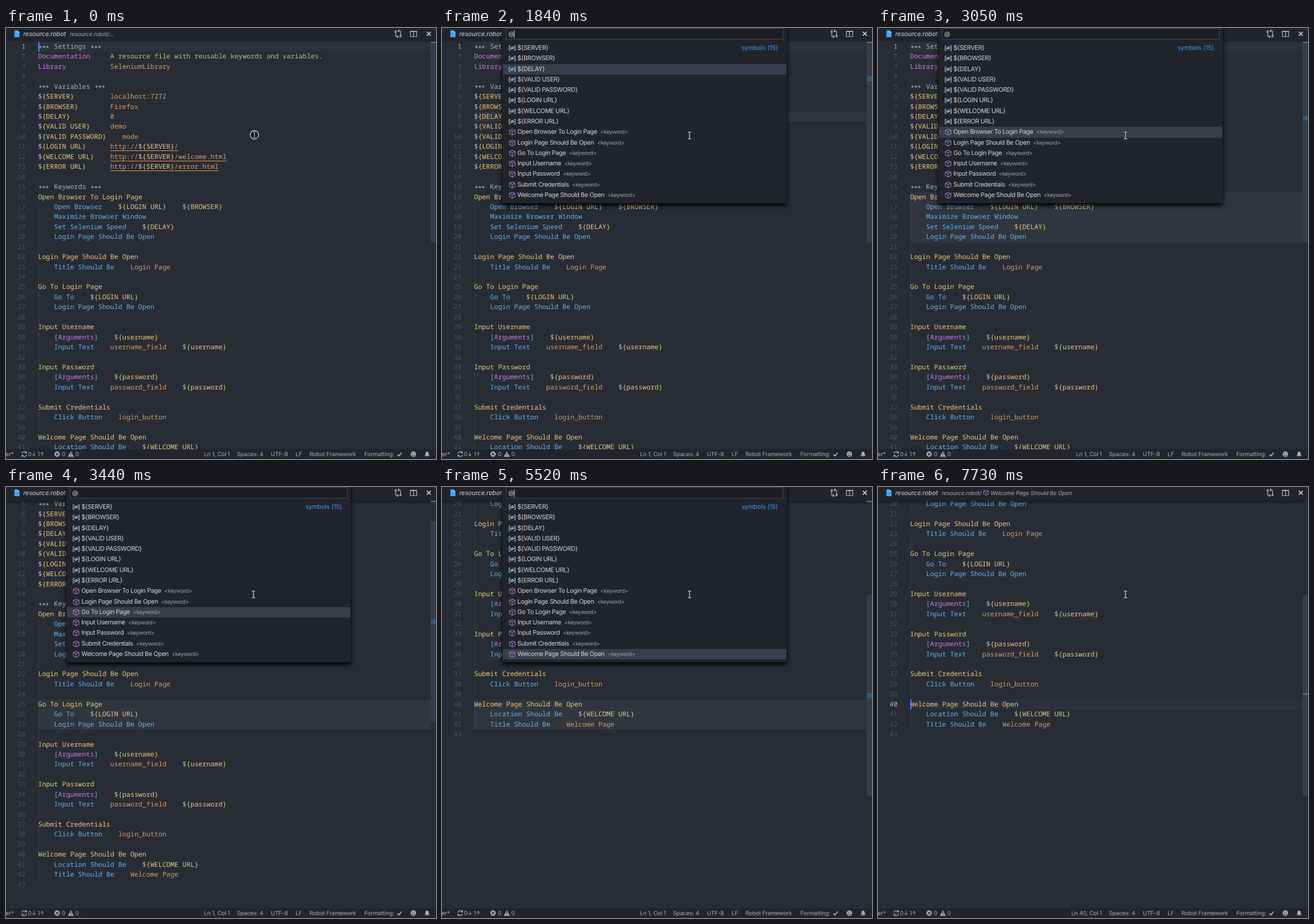
Animation of 747x750 px, one loop 8 s. Source, as an HTML page:

```html
<!DOCTYPE html>
<html lang="en">
<head>
<meta charset="utf-8">
<title>Symbol navigation</title>
<style>
  html, body { margin: 0; width: 100%; height: 100%; overflow: hidden; background: #282c34; }
  body { position: relative; text-rendering: geometricPrecision; }
  div { position: absolute; box-sizing: border-box; }
  .ui { font-family: Inter, "Liberation Sans", sans-serif; letter-spacing: -.024em; }

  #editor { left: 0; top: 24px; width: 747px; height: 709px; overflow: hidden; }
  #page { left: 0; top: 0; width: 738px; }
  #page div { white-space: pre; }
  #lines { left: 0; top: 0; }
  .code, .num { font: 11.62px/17.436px "Noto Sans Mono", "DejaVu Sans Mono", monospace; height: 17.436px; }
  .code { left: 55.7px; color: #abb2bf; }
  .num { left: 0; width: 34px; text-align: right; color: #495162; }
  .num.on { color: #abb2bf; }
  .guide { left: 56px; width: 1px; background: #3b4048; }
  .band { left: 56px; width: 682px; }
  #cursorLine { background: #2c313c; height: 17.436px; }
  #range { background: rgba(255, 255, 255, .045); }
  #caret { left: 56px; width: 1.6px; height: 17px; background: #528bff; }
  .code b { font-weight: 400; }
  .star { display: inline-block; width: 3ch; padding-left: .5px; box-sizing: border-box;
          font-style: normal; letter-spacing: -1px; position: relative; top: 2.5px; }
  .purple { color: #d078e8; } .green { color: #a2cf78; } .orange { color: #dd9a5e; }
  .yellow { color: #f0c977; } .blue { color: #5bb4fa; } .cyan { color: #4fc3d0; } .grey { color: #b9bdc0; }
  .link { text-decoration: underline 1px; text-underline-offset: 2.5px; }
  #edge { left: 0; top: 0; width: 738px; height: 6px; background: linear-gradient(rgba(0,0,0,.4), transparent); }
  #thumb { left: 738px; width: 9px; background: #373d48; }
  .mark { left: 738px; width: 9px; }
  #cursorMark { height: 2px; background: #4f7596; }
  #rangeMark { height: 8.6px; background: #2d5b86; }

  #chrome { position: absolute; left: 0; top: 0; }
  .tab { font-size: 10.8px; font-style: italic; letter-spacing: -.007em; fill: #d7dae0; }
  .crumb { font-size: 9.75px; font-style: italic; letter-spacing: -.018em; fill: #a3a9b5; }
  .status { font-size: 9.97px; letter-spacing: -.015em; fill: #a6adba; }
  .line { fill: none; stroke: #b4bac6; stroke-width: 1.2; }

  #picker { left: 105px; top: -4px; width: 494px; background: #21252b; overflow: hidden; }
  #shade { left: 105px; top: -4px; width: 494px; box-shadow: 0 4px 7px #000; }
  #field { left: 6px; top: 4px; width: 482px; height: 20px; background: #1b1d23; border: 1px solid #464646;
           color: #d0d4dc; font-size: 10.8px; line-height: 19px; padding-left: 3px; }
  #fieldCaret { left: 13.4px; top: 3px; width: 1px; height: 14px; background: #d0d4dc; }
  #rows { left: 0; top: 30px; }
  .row { left: 1px; width: 492px; height: 18.28px; line-height: 18.28px; font-size: 10.8px; color: #d3d6dc; white-space: pre; }
  .row svg { position: absolute; left: 9.5px; top: 3px; }
  .row span { position: absolute; left: 25px; }
  .row small { font-size: 9.6px; color: #9a9fa9; margin-left: 5.5px; }
  .row.on { background: #383e4a; }
  #group { right: 15.5px; top: 30px; line-height: 18.28px; font-size: 10.8px; letter-spacing: -.01em; color: #3f97f3; }
  #mouse { position: absolute; left: 420px; top: 174px; }
</style>
</head>
<body>
<div id="editor">
  <div id="page">
    <div id="cursorLine" class="band"></div>
    <div id="range" class="band"></div>
    <div id="lines"></div>
    <div id="caret"></div>
  </div>
  <div id="edge"></div>
  <div id="thumb"></div>
  <div id="rangeMark" class="mark"></div>
  <div id="cursorMark" class="mark"></div>
</div>

<svg id="chrome" class="ui" width="747" height="750">
  <defs>
    <symbol id="cube" viewBox="0 0 12 12">
      <path d="M6 .8 10.8 3v6L6 11.3 1.2 9V3ZM1.2 3 6 5.3 10.8 3M6 5.3v6" fill="none" stroke="#b180d7"/>
    </symbol>
    <symbol id="variable" viewBox="0 0 12 12">
      <path d="M3 2H.8v8H3M9 2h2.2v8H9" fill="none" stroke="#c5c8ce" stroke-width="1.1"/>
      <path d="M2.6 5 6.8 3 9.4 4.2v2.2L5.2 8.6 2.6 7.3Z" fill="#75beff"/>
      <path d="M3.5 5.2 5.3 6 8.5 4.5" fill="none" stroke="#21252b" stroke-width=".7"/>
    </symbol>
    <path id="ibeam" d="M7 7q2.500 0 3 1 .5-1 3-1M10 8v10M7 19q2.500 0 3-1 .5 1 3 1"/>
  </defs>
  <path d="M0 0h747v24H0ZM0 733h747v17H0Z" fill="#21252b"/>
  <path d="M14.5 4h5l4 4v8h-9Z" fill="#42a5f5"/>
  <path d="M19.5 4v4h4" fill="#a5d4fa"/>
  <text class="tab" x="30" y="13.5">resource.robot</text>
  <text class="crumb" x="111" y="13.5">resource.robot/<tspan id="dots">...</tspan></text>
  <g id="place">
    <use href="#cube" x="182.500" y="4.5" width="10.5" height="10.5"/>
    <text class="crumb" x="195.5" y="13.5">Welcome Page Should Be Open</text>
  </g>
  <g class="line">
    <path d="M677 7.5v5.5q0 2 2 2h2M679.5 13l2 2-2 2M685.5 12.5V7q0-2-2-2h-2M683 3l-2 2 2 2"/>
    <circle cx="677" cy="6" r="1.4"/><circle cx="685.5" cy="14" r="1.4"/>
    <path d="M702.5 5.5h11v9.5h-11ZM708 5.5V15M702.5 6.2h11"/>
    <path d="M731 6.5l7 7M738 6.5l-7 7" stroke="#d7dae0" stroke-width="1.7"/>
    <path d="M27.7 740.5a4 4 0 0 1 7.3-1.5M35.7 742.5a4 4 0 0 1-7.3 1.5M35.5 736.5v3h-3M27.9 746.5v-3h3"/>
    <path d="M680 742l2.5 2.7 5-6" stroke-width="1.7"/>
  </g>
  <g fill="#a6adba">
    <circle cx="88.7" cy="741.5" r="4.7"/>
    <path d="M112.6 736.5l5.2 9.7h-10.4Z"/>
    <circle cx="707.7" cy="741.5" r="4.8"/>
    <path d="M727 744.8q1.7-1.3 1.7-4.3 0-3 2.8-3.5 2.8.5 2.8 3.5 0 3 1.7 4.3ZM730.3 745.4h2.4q-1.2 1.8-2.4 0Z"/>
  </g>
  <path d="M86.7 739.5l4 4M90.7 739.5l-4 4M112.6 739.5v3.5M112.6 744v1.2M705 742.5q2.7 3.5 5.4 0M706 739v1.5M709.4 739v1.5" fill="none" stroke="#21252b" stroke-width="1.2"/>
  <g class="status">
    <text x="-.5" y="745">er*</text>
    <text x="38" y="745">0↓ 1↑</text>
    <text x="97" y="745">0</text>
    <text x="120.5" y="745">0</text>
    <text id="position" x="389" y="745" text-anchor="end"></text>
    <text x="401" y="745">Spaces: 4</text>
    <text x="460" y="745">UTF-8</text>
    <text x="503" y="745">LF</text>
    <text x="527" y="745">Robot Framework</text>
    <text x="622.5" y="745">Formatting:</text>
  </g>
</svg>

<div id="shade"></div>
<div id="picker" class="ui">
  <div id="field">@<div id="fieldCaret"></div></div>
  <div id="rows"></div>
  <div id="group">symbols (15)</div>
</div>

<svg id="mouse" width="24" height="24">
  <circle id="ring" cx="11.5" cy="12" r="7.3" fill="#16181c" stroke="#e8e8e8" stroke-width="1.2"/>
  <g id="beam" fill="none">
    <use href="#ibeam" stroke="#111" stroke-width="2.6"/>
    <use href="#ibeam" stroke="#f2f2f2" stroke-width="1.2"/>
  </g>
</svg>

<script>
const SOURCE = `*** Settings ***
Documentation     A resource file with reusable keywords and variables.
Library           SeleniumLibrary

*** Variables ***
\${SERVER}         localhost:7272
\${BROWSER}        Firefox
\${DELAY}          0
\${VALID USER}     demo
\${VALID PASSWORD}    mode
\${LOGIN URL}      http://\${SERVER}/
\${WELCOME URL}    http://\${SERVER}/welcome.html
\${ERROR URL}      http://\${SERVER}/error.html

*** Keywords ***
Open Browser To Login Page
    Open Browser    \${LOGIN URL}    \${BROWSER}
    Maximize Browser Window
    Set Selenium Speed    \${DELAY}
    Login Page Should Be Open

Login Page Should Be Open
    Title Should Be    Login Page

Go To Login Page
    Go To    \${LOGIN URL}
    Login Page Should Be Open

Input Username
    [Arguments]    \${username}
    Input Text    username_field    \${username}

Input Password
    [Arguments]    \${password}
    Input Text    password_field    \${password}

Submit Credentials
    Click Button    login_button

Welcome Page Should Be Open
    Location Should Be    \${WELCOME URL}
    Title Should Be    Welcome Page
`;

const LOOP = 8000, LINE = 17.436, VIEW = 709, ROW = 18.28;
const OPEN = 530, LISTED = 650, CLOSE = 5760, JUMP = 5880, RING_END = 120;
const ROW_TIMES = [1370, 1610, 1840, 2080, 2310, 2460, 2690, 2930, 3050, 3290, 3440, 3790, 4030, 4450, 4900];
const FIELD_BLINKS = [650, 1130, 1610, 2080, 2580, 3050, 3610, 4030, 4630, 5020, 5520];
const EDITOR_BLINKS = [0, 120, 5880, 6300, 6770, 7250, 7730];

const byId = id => document.getElementById(id);
const sourceLines = SOURCE.split('\n');
const lineTop = n => (n - 1) * LINE;
const passed = (times, t) => times.filter(x => x <= t).length;
const blinking = (times, t) => passed(times, t) % 2 === 1;
const show = (id, on) => { byId(id).style.visibility = on ? 'inherit' : 'hidden'; };
const span = (cls, text) => `<b class="${cls}">${text}</b>`;

function cellClass(cell, first, indented) {
  if (!first) return cell.startsWith('A ') ? 'green' : /^http/.test(cell) ? 'orange link' : 'orange';
  if (/^(Documentation|Library|\[.*)$/.test(cell)) return 'purple';
  return indented ? 'blue' : 'yellow';
}

function paint(line) {
  if (line.startsWith('*')) return line.replace(/\*{3}/g, '<i class="star">***</i>');
  let first = true;
  return line.split(/( {2,})/).map(cell => {
    if (!cell.trim()) return cell;
    const cls = cellClass(cell, first, line.startsWith(' '));
    first = false;
    return span(cls, cell
      .replace(/[[\]]/g, m => span('cyan', m))
      .replace(/\$(\{.*?\})/g, (_, name) => span('grey', '$') + span('yellow', name)));
  }).join('');
}

// Symbols are the variables and the keyword blocks, each with its first and last line.
const symbols = [];
const keywordsFrom = sourceLines.indexOf('*** Keywords ***');
let html = '';
sourceLines.forEach((line, i) => {
  const n = i + 1, y = `top:${lineTop(n)}px`;
  html += `<div class="num" style="${y}">${n}</div><div class="code" style="${y}">${paint(line)}</div>`;
  const isVariable = line.startsWith('$');
  if (!isVariable && !(i > keywordsFrom && /^\w/.test(line))) return;
  let last = n;
  while (sourceLines[last].startsWith(' ')) last++;
  symbols.push({ name: isVariable ? line.match(/^.*?\}/)[0] : line, isVariable, first: n, last });
  if (!isVariable) {
    const end = Math.min(last + 1, sourceLines.length - 1);
    html += `<div class="guide" style="top:${lineTop(n + 1)}px;height:${(end - n) * LINE}px"></div>`;
  }
});
byId('lines').innerHTML = html;
byId('rows').innerHTML = symbols.map((s, i) => {
  const icon = s.isVariable ? 'variable' : 'cube';
  const kind = s.isVariable ? '' : '<small>&lt;keyword&gt;</small>';
  return `<div class="row" style="top:${i * ROW}px">` +
    `<svg width="12" height="12"><use href="#${icon}"/></svg><span>${s.name}${kind}</span></div>`;
}).join('');
const rowEls = document.querySelectorAll('.row');
const numberEls = document.querySelectorAll('.num');

function draw(t) {
  const row = passed(ROW_TIMES, t) - 1;
  const symbol = symbols[row];
  const isOpen = t >= OPEN && t < CLOSE, isListed = isOpen && t >= LISTED;
  const cursor = t >= JUMP ? symbols[symbols.length - 1].first : 1;
  const offset = symbol ? Math.max(0, (symbol.first - .5) * LINE - VIEW / 2) : 0;
  const ratio = VIEW / ((sourceLines.length - 1) * LINE + VIEW);

  byId('page').style.top = -offset + 'px';
  byId('thumb').style.top = offset * ratio + 'px';
  byId('thumb').style.height = VIEW * ratio + 'px';
  show('edge', offset > 0);

  byId('cursorLine').style.top = byId('caret').style.top = lineTop(cursor) + 'px';
  byId('cursorMark').style.top = lineTop(cursor) * ratio + 'px';
  show('caret', blinking(EDITOR_BLINKS, t));
  numberEls.forEach((el, i) => el.classList.toggle('on', i + 1 === cursor));

  const ranged = isOpen && !!symbol;
  show('range', ranged);
  show('rangeMark', ranged);
  if (ranged) {
    byId('range').style.top = lineTop(symbol.first) + 'px';
    byId('range').style.height = (symbol.last - symbol.first + 1) * LINE + 'px';
    byId('rangeMark').style.top = lineTop(symbol.first) * ratio + 'px';
  }

  show('picker', isOpen);
  show('shade', isOpen);
  byId('picker').style.height = byId('shade').style.height = (isListed ? 309 : 30) + 'px';
  show('rows', isListed);
  show('group', isListed);
  show('fieldCaret', isOpen && blinking(FIELD_BLINKS, t));
  rowEls.forEach((el, i) => el.classList.toggle('on', i === row));

  show('ring', t < RING_END);
  byId('beam').setAttribute('transform', t < RING_END ? 'translate(3.5 1.6) scale(.8)' : 'scale(1)');
  show('dots', t < JUMP);
  show('place', t >= JUMP);
  byId('position').textContent = `Ln ${cursor}, Col 1`;
}

const startTime = performance.now();
function tick() {
  draw((performance.now() - startTime) % LOOP);
  requestAnimationFrame(tick);
}
tick();
</script>
</body>
</html>
```
